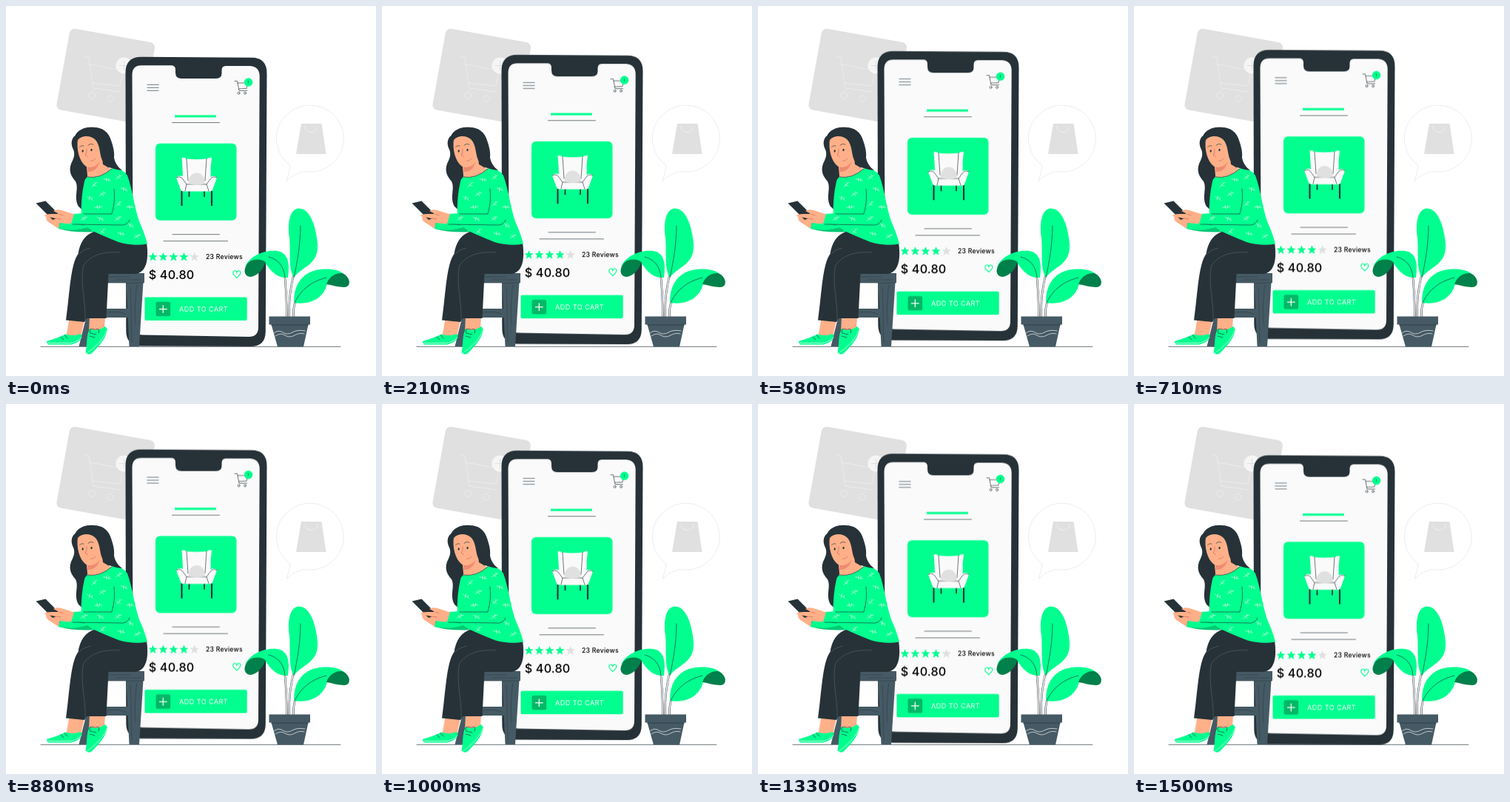
Animation, 500 px wide and 500 px high, one loop 1.54 s. Source, as an HTML page:

```html
<!DOCTYPE html>
<html lang="en">
<head>
<meta charset="utf-8">
<title>Add to cart</title>
<style>
html, body { margin: 0; width: 100%; height: 100%; overflow: hidden; background: #fff; }
svg { display: block; width: 100%; height: 100%; font-family: Inter, sans-serif; }
.green { fill: #00ff8f; }
.shade { fill: #00804a; }
.ink { fill: #263238; }
.slate { fill: #455a64; }
.pale { fill: #e0e0e0; }
.skin { fill: #ffb089; }
.line { fill: none; stroke: #263238; stroke-width: .65; stroke-linecap: round; stroke-linejoin: round; }
.light { fill: none; stroke: #f5f5f5; stroke-width: .7; stroke-linecap: round; stroke-linejoin: round; }
.blush { fill: none; stroke: #d9705a; stroke-width: .8; stroke-linecap: round; }
.phone { animation: bob 1540ms linear infinite; }
@keyframes bob {
  0%, 100% { transform: translateY(0); }
  46.2% { transform: translateY(-9.55px); }
  97.4% { transform: translateY(.45px); }
}
</style>
</head>
<body>
<svg viewBox="0 0 500 500">
  <defs>
    <path id="star" d="M0-6 1.7-2 6-1.7 2.7 1.1 3.8 5.4 0 3-3.8 5.4-2.7 1.1-6-1.7-1.7-2Z"/>
    <path id="sprig" class="light" d="M-3.500 3.500Q-1 0 3-3M-1 1-3-.5M-1 1 1.500 2M1-1-.5-3"/>
    <path id="stems" d="M376 357Q379 385 379.500 420M388.500 364Q382 390 382.500 420M391 400Q388 408 388.500 420"/>
  </defs>

  <!-- backdrop card -->
  <g>
    <rect class="pale" width="117" height="111.500" rx="7" transform="translate(87 29.600) rotate(10.200)"/>
    <g class="light" opacity=".75">
      <path d="M104 68 112 70 118 111 154 116M113 79 158 87 154 108 117 104"/>
      <circle cx="116" cy="121" r="4.300"/>
      <circle cx="141" cy="125.500" r="4.300"/>
    </g>
    <circle cx="159.500" cy="80.500" r="11" fill="#f5f5f5"/>
    <path d="M159.500 74v13M153 80.500h13" stroke="#e0e0e0"/>
  </g>

  <!-- speech bubble -->
  <path d="M384 215.500A45.500 45 0 1 1 402 223.300Q389 227 379 236Q383 227 384 215.500Z" fill="#fff" stroke="#e6e6e6" stroke-width=".7"/>
  <path class="pale" d="M399 159H426.500L432.500 200H392Z"/>
  <path class="light" d="M403 163C407 173 418 173 422 163"/>

  <path class="line" d="M47 460.400H452"/>

  <g class="phone">
    <path class="ink" d="M183 68.700 332 69.800Q352.500 70 352.500 91L350.800 440Q350.500 460 331 460L182 459.500Q162.500 459 162.300 439L161.500 90Q161.500 68.700 183 68.700Z"/>
    <path fill="#fafafa" d="M170.500 93Q170.500 80.300 183 80.300H223Q229 80.300 229 86V90Q229 98 237 98H284Q291.500 98 291.500 91V87Q291.500 81 297 81H330Q342.700 82 342.700 95L341 434Q341 447 328 447L185 444.500Q172 444 172 431Z"/>

    <path d="M190.500 106.300h16M190.500 110.300h16M190.500 114.300h16" stroke="#455a64" stroke-width=".8"/>
    <path class="line" d="M309 101.500h3.500L315 114.500H325.500M313 104H326.500L325 111.500 314.500 112"/>
    <circle class="line" cx="314.500" cy="117.700" r="1.500"/>
    <circle class="line" cx="323" cy="117.700" r="1.500"/>
    <circle class="green" cx="327.600" cy="103" r="5.800"/>
    <text x="326.600" y="104.800" font-size="4.500" class="ink">1</text>

    <rect class="green" x="228" y="147.500" width="56" height="3"/>
    <path class="line" d="M224.500 157.600H288.500M225 308.700H288.500M213 317.700H299.500"/>

    <!-- product -->
    <rect class="green" x="202" y="185.700" width="109.500" height="104" rx="6"/>
    <g stroke="#263238">
      <path d="M237.500 250v20M278 250v20" stroke-width="2.100"/>
      <path d="M247.500 249v9M268 249v9" stroke-width="1.700"/>
    </g>
    <path d="M237.500 205Q241 204 244 206.500Q257 208 271 206.500Q275 204 278 205L276.500 219Q277 225 276.500 231Q282 228 285 232L279 248.500Q278 250.500 274 250.500H241Q237 250.500 236 248L230 232Q233 228 239 230L238.500 219Z" fill="#fafafa"/>
    <path class="line" d="M244 206.500 246 236M271 206.500 269 236M230 232Q236 229 239 234L244 241H271L276 234Q280 229 285 232M244 241 242 250M271 241 274 250"/>
    <path class="pale" d="M247 240C246 231 251 225.500 257.700 225.500S269 231 268.500 240Q258 244 247 240Z"/>

    <g class="green">
      <use href="#star" x="198.500" y="339"/>
      <use href="#star" x="212.500" y="339"/>
      <use href="#star" x="226.500" y="339"/>
      <use href="#star" x="240.500" y="339"/>
    </g>
    <use class="pale" href="#star" x="254.700" y="339"/>
    <text x="270" y="342.300" font-size="8.700" font-weight="500" letter-spacing=".22">23 Reviews</text>
    <text x="192.800" y="369" font-size="16.200" font-weight="500" letter-spacing=".15">$ 40.80</text>
    <path d="M311.800 367.300C307 363.500 306.300 361.500 307 359.500C308 357 311 357.300 311.800 360C312.600 357.300 315.800 357 316.700 359.500C317.400 361.500 316.500 363.500 311.800 367.300Z" fill="none" stroke="#00ff8f" stroke-width="1.200"/>

    <rect class="green" x="187.500" y="393.600" width="138.200" height="31.500" rx="2"/>
    <rect x="202.500" y="399.800" width="19.700" height="19.500" rx="2.500" fill="#00b866"/>
    <path d="M212.300 404.200v10.800M206.900 409.600h10.800" stroke="#fff" stroke-width="1.200"/>
    <text x="234" y="413" font-size="9.100" letter-spacing=".42" fill="#fff">ADD TO CART</text>
  </g>

  <!-- plant -->
  <g>
    <use href="#stems" fill="none" stroke="#263238" stroke-width="2.400"/>
    <use href="#stems" fill="none" stroke="#fff" stroke-width="1.400"/>
    <path class="green" d="M389 367C381 354 385 333 383 313C380 291 384 274 396 273.500C412 274 419 300 421 321C423 350 401 351 389 367Z"/>
    <path class="green" d="M323 352C330 338 348 329 366 331C381 333 384 347 381 367C368 368 358 360 350 346C340 340 330 345 323 352Z"/>
    <path class="shade" d="M322.500 357C324 346 333 342 341 342.500Q348 343 350.500 346C347 358 338 366 329 366Q322 364 322.500 357Z"/>
    <path class="green" d="M389.500 401C388 382 397 362 419 357C440 353 458 357 463 371L434 375C431 391 415 405 389.500 401Z"/>
    <path class="shade" d="M433 376C436 366 446 360 454 361Q462 364 464 372Q464 380 457 380C448 380 441 377 433 376Z"/>
    <path class="line" d="M398 297C398 320 394 345 389 367M355 339C370 343 376 354 377 367M433 367C410 373 398 385 390 401"/>
    <path class="slate" d="M355.500 419.500H411V430.500H408.500L402 460.400H367L358.500 430.500H355.500Z"/>
    <path class="line" d="M358.500 431H408.500"/>
    <path class="light" d="M362 442Q368 437 374 441T387 441T404 439M364 446Q371 441 377 445T390 445T403 443"/>
  </g>

  <!-- stool -->
  <g>
    <path class="slate" d="M120 374H135L109 460H98.500ZM108 409H168V421H105ZM162.500 373H185.500L180 460H166.500ZM133 361H187V374H130Z"/>
    <path class="line" opacity=".6" d="M134 374.300H186M168 380 170 454M177 377Q173 400 175 430M140 366H167M148 370H182M137 414Q150 412 162 416"/>
  </g>

  <!-- woman -->
  <g>
    <path class="ink" d="M119 164C106 163 97 168 93.500 175C87 180 88 188 91 194C94 201 91 207 88 213C84 224 89 231 94 237C99 247 91 258 98 271L105 277 118 240 140 222 134 180Z"/>

    <path class="skin" d="M86 420H107L101 447Q90 454 81 448ZM113 418H134L133 438Q121 447 112 440Z"/>
    <path class="green" d="M55 453Q69 449 81 443.500Q91 447 101 443L102.500 447Q100 455 88 457.500H58Q54.500 457 55 453Z"/>
    <path class="green" d="M113 436Q122 441 134 433L137 437C136 448 125 461 115 470Q109 472 107.500 468C110 457 108 447 113 436Z"/>
    <path class="light" d="M55.500 455.500H87Q97 454 102 448M109 469.500C122 460 133 449 136.500 438"/>
    <path class="line" d="M74 447 78 451M79 444.500 83 449M113 446 120 448M114 442 122 444M120 437Q110 434 114 442M121 437Q128 434 125 442"/>

    <path class="ink" d="M122 304C107 308 100 319 97.500 335C87 349 86 390 81 424.500L106 427 109 422H135.500L138.500 362H175C191 360 193 340 190 320L150 316Z"/>
    <path d="M154 333C132 331 114 337 105 350C99 372 108 397 107 424M98 335Q105 329 114 327" fill="none" stroke="#60717a" stroke-width=".5"/>

    <path class="skin" d="M108 208 110 229Q108 235 116 235Q135 232 143 221L131 214 129 196Z"/>
    <path d="M110 216Q121 220 127 210Q122 225 110.500 224Z" fill="#ed8b72"/>
    <path class="skin" d="M97 180C95 194 99 209 107 216C115 221 123 216 127 208L131 194C129 181 122 174 112 174Q102 174 97 180Z"/>
    <path class="line" d="M99.500 190.500Q102 187.500 105 189M111 188Q114 185 118 187"/>
    <path class="blush" d="M109 193Q110 198 107 201.500L110 203M115 209.500Q119 209.500 121 206"/>
    <ellipse class="ink" cx="103.700" cy="196" rx="1.100" ry="1.700"/>
    <ellipse class="ink" cx="115.500" cy="194.500" rx="1.100" ry="1.700"/>

    <path class="skin" d="M55 281Q53 287 56 291L71 301 78 293 68 281Z"/>
    <path d="M73 292 88 292 120 295 120 305Q93 307 71 301Z" fill="#00c875"/>
    <path class="green" d="M110 231Q127 234 143 219.500Q158 219 164 229C171 248 173 270 180 291Q188 309 191 321.500Q172 325 152 319Q132 311 117 304L103 294C100 272 103 250 106 237Q107 233 110 231Z"/>
    <path class="green" d="M91 281 105 280 142 281 144 265 174 268Q176 295 158 296L88 294.500Z"/>
    <path class="green" d="M74 293 88 293 112 298Q96 305 71 301Z"/>
    <path class="line" d="M146 247Q148 264 143 281L105 281M90 295 158 296Q165 295 167 289M110 231Q127 234 143 220"/>
    <g id="sprigs" opacity=".85"></g>

    <path class="ink" d="M97 181C102 175 114 174 121 181C128 189 126 203 131 210C136 218 145 221 157 222C151 218 147 211 146 205C147 196 144 188 142.500 183C139 170 130 164 119 164C106 163 97 169 93.500 176Z"/>

    <path class="ink" d="M40.500 266.500 53.500 263.500 75 285 63 289Z"/>
    <path class="skin" d="M92 281.500 75 276Q68 274 64 277L72 281 62 281Q52 281 52 284L67 287 64 291Q76 295 88 294Z"/>
    <path class="blush" d="M72 281 77 283M67 287 74 288"/>
  </g>
</svg>
<script>
const spots = [[120, 241, 0], [137, 235, 60], [153, 231, 10], [114, 260, 80], [131, 254, 20],
  [160, 248, 70], [125, 272, 40], [153, 267, 0], [168, 272, 50], [106, 287, 20], [128, 288, 75],
  [152, 287, 15], [131, 304, 0], [156, 308, 60], [178, 311, 20], [169, 297, 80]];
document.getElementById('sprigs').innerHTML = spots.map(([x, y, a]) =>
  `<use href="#sprig" transform="translate(${x} ${y}) rotate(${a})"/>`).join('');
</script>
</body>
</html>
```
